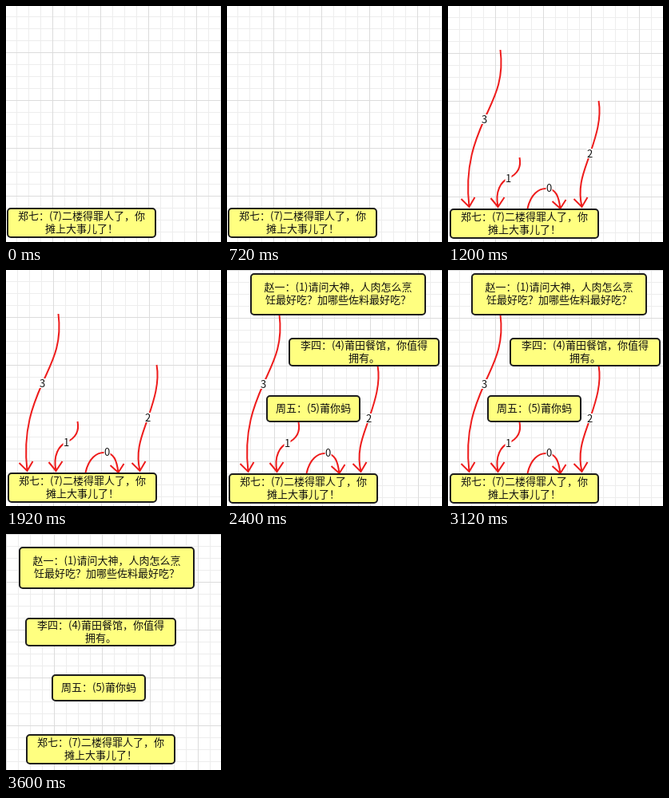
These frames come from a looping animation (269 by 296 pixels, 4.8 s). An HTML page with a canvas:

```html
<!DOCTYPE html>
<html lang="zh-CN">
<head>
<meta charset="utf-8">
<style>
  html, body { margin: 0; width: 100%; height: 100%; overflow: hidden; background: #fff; }
  canvas { display: block; width: 269px; height: 296px; }
</style>
</head>
<body>
<canvas id="stage" lang="zh-CN"></canvas>
<script>
const W = 269, H = 296, STEP = 1200, LINE = 16;
const canvas = document.getElementById('stage');
const ctx = canvas.getContext('2d');
const ratio = window.devicePixelRatio || 1;
canvas.width = W * ratio;
canvas.height = H * ratio;

const notes = {
  zhao: { w: 218, h: 51, lines: ['赵一：(1)请问大神，人肉怎么烹', '饪最好吃？加哪些佐料最好吃？'] },
  li: { w: 187, h: 34, lines: ['李四：(4)莆田餐馆，你值得', '拥有。'] },
  zhou: { w: 116, h: 32, lines: ['周五：(5)莆你蚂'] },
  zheng: { w: 185, h: 36, lines: ['郑七：(7)二楼得罪人了，你', '摊上大事儿了！'] }
};

// Curve, arrowhead, label and label position
const arrows = [
  ['M65 55C70 95 56 117 45 142S20 200 26 252', 'M16 242L26 252L33 240', '3', 45, 142],
  ['M89 190C92 205 84 212 75 216S58 232 62 252', 'M53 241L62 252L70 240', '1', 75, 216],
  ['M99 254C103 236 113 229 122 229C135 229 138 239 140 254', 'M130 245L140 254L147 243', '0', 126, 228],
  ['M188 119C192 142 184 165 177 186S161 225 167 252', 'M157 242L167 252L174 240', '2', 177, 185]
].map(([line, head, label, x, y]) => ({ path: new Path2D(line + head), label, x, y }));

// Each scene: grid origin, arrow shift (or null), notes as [name, left, top]
const scenes = [
  { grid: [58, 58], shift: null, boxes: [['zheng', 2, 254]] },
  { grid: [59, 59], shift: 0, boxes: [['zheng', 3, 255]] },
  { grid: [59, 60], shift: 1,
    boxes: [['zhao', 30, 5], ['li', 78, 86], ['zhou', 50, 158], ['zheng', 3, 256]] },
  { grid: [60, 60], shift: null,
    boxes: [['zhao', 17, 17], ['li', 25, 106], ['zhou', 58, 177], ['zheng', 26, 252]] }
];

function drawGrid([gx, gy]) {
  for (const major of [false, true]) {
    const gap = major ? 60 : 15;
    ctx.fillStyle = major ? '#dcdcdc' : '#ededed';
    for (let x = gx % gap; x < W; x += gap) ctx.fillRect(x, 0, 1, H);
    for (let y = gy % gap; y < H; y += gap) ctx.fillRect(0, y, W, 1);
  }
}

function drawText(text, x, baseline) {
  ctx.fillStyle = '#111';
  ctx.fillText(text, x, baseline);
}

function drawArrow({ path, label, x, y }) {
  ctx.strokeStyle = '#ee1c1c';
  ctx.stroke(path);
  ctx.fillStyle = '#fff';
  ctx.fillRect(x - 4, y - 6, 8, 12);
  drawText(label, x, y + 5);
}

function drawNote([name, x, y]) {
  const { w, h, lines } = notes[name];
  ctx.beginPath();
  ctx.roundRect(x, y, w, h, 4);
  ctx.fillStyle = '#ffff80';
  ctx.fill();
  ctx.strokeStyle = '#1c1c1c';
  ctx.stroke();
  const first = Math.floor(y + h / 2 + 4 - LINE * (lines.length - 1) / 2);
  lines.forEach((line, i) => drawText(line, x + w / 2, first + LINE * i));
}

function draw(now) {
  const scene = scenes[Math.floor(now / STEP) % scenes.length];
  ctx.setTransform(ratio, 0, 0, ratio, 0, 0);
  ctx.fillStyle = '#fff';
  ctx.fillRect(0, 0, W, H);
  ctx.font = '13px "Noto Sans CJK SC", "Noto Sans CJK", sans-serif';
  ctx.textAlign = 'center';
  ctx.lineWidth = 2;
  drawGrid(scene.grid);
  if (scene.shift !== null) {
    ctx.save();
    ctx.translate(0.5, scene.shift);
    arrows.forEach(drawArrow);
    ctx.restore();
  }
  scene.boxes.forEach(drawNote);
}

const start = performance.now();
function tick() {
  draw(performance.now() - start);
  requestAnimationFrame(tick);
}
tick();
</script>
</body>
</html>
```
